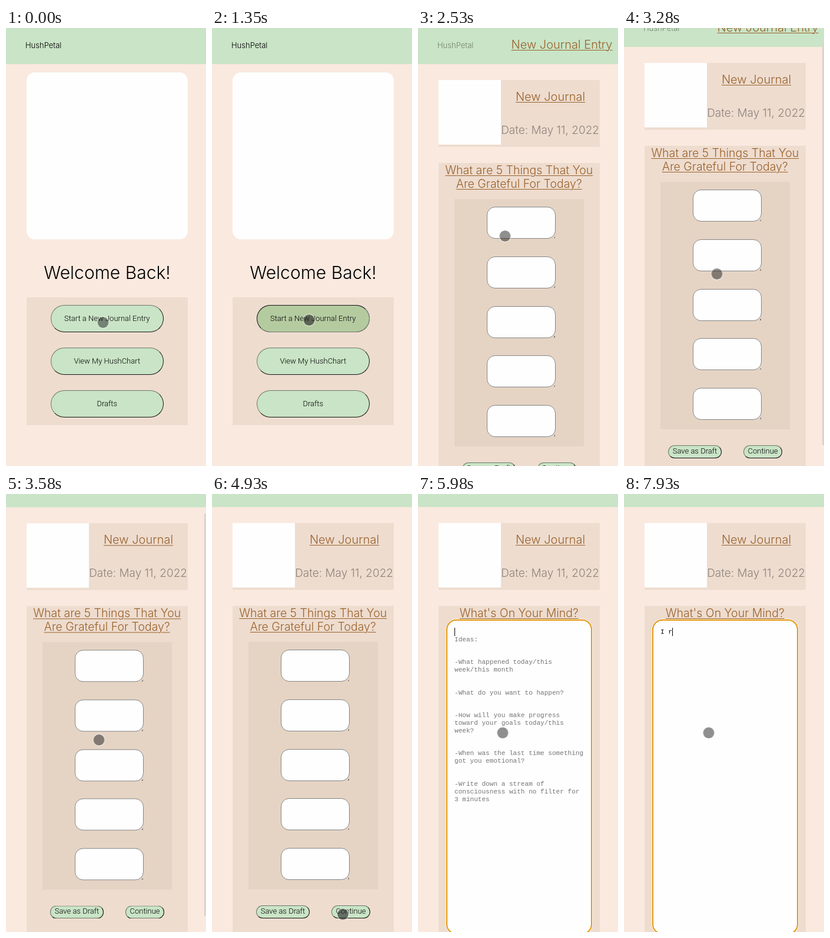
An HTML page that plays this animation: 340x740 px, repeating every 8 s.

```html
<!DOCTYPE html>
<html lang="en">
<head>
<meta charset="utf-8">
<title>Journal app</title>
<style>
html, body { margin: 0; width: 100%; height: 100%; overflow: hidden; background: #fae9df; }
#stage { position: relative; width: 340px; height: 740px; overflow: hidden; background: #fae9df; font: 300 20px/24px Inter, sans-serif; color: #000; }
#stage div { position: absolute; box-sizing: border-box; white-space: nowrap; }
.layer { left: 0; top: 0; width: 340px; height: 840px; }
.bar { left: 0; top: 0; width: 340px; height: 61px; background: #c9e4c6; }
.panel { left: 34.5px; width: 274.5px; background: #eedccf; }
.logo { left: 35px; background: #fefefe; }
.name { left: 33px; top: 16.5px; font-size: 13px; }
.link { text-align: center; color: #99622c; text-decoration: underline; text-decoration-thickness: 1.3px; text-underline-offset: 1.5px; }
.ask { left: 34.5px; width: 274.5px; top: 228.7px; font-size: 19.5px; line-height: 23.7px; }
.btn { border: 1.6px solid; border-color: #6f7a6f #151515 #151515 #6f7a6f; background: #c9e4c6; border-radius: 23px; font: 300 13px/43px Roboto, sans-serif; text-align: center; }
.big { left: 75.5px; width: 192.5px; height: 45.5px; }
.small { top: 734px; height: 21.5px; line-height: 18.3px; border-radius: 11px; }
.field { left: 117px; width: 116.5px; height: 54px; border: 1px solid #858585; border-radius: 14px; background: #fefefe; }
.field::after { content: ""; position: absolute; right: 0; bottom: 0; width: 3px; height: 3px; background: linear-gradient(135deg, transparent 50%, #777 50%); }
.mono { font: 400 11.07px/12.86px "Liberation Mono", monospace; left: 62px; }
#stage .hint { color: #757575; white-space: pre; top: 278.6px; }

/* Every change is a hard step on one 8 s clock */
#home, #entry, #grateful, #mind, #press, #rest, #focus, #hint, #typed div, #bar, #scroll, #cursor, #caret { animation: 8s step-end infinite; }
#home { animation-name: home; }
#entry { animation-name: entry; }
#grateful { animation-name: grateful; }
#mind { animation-name: mind; }
#press { animation-name: press; background: #b4cba0; border-color: #151515 #6f7a6f #6f7a6f #151515; }
#rest { animation-name: rest; left: 49px; top: 252px; width: 246px; height: 530px; border: 1px solid #858585; border-radius: 16px; background: #fefefe; }
#focus { animation-name: focus; left: 48px; top: 251px; width: 248px; height: 532px; border: 2px solid #e59a10; border-radius: 17px; background: #fefefe; box-shadow: 0 0 0 1px #fff9; }
#hint { animation-name: hint; }
#typed #one { animation-name: one; }
#typed #two { animation-name: two; }
#caret { animation-name: caret; left: 62px; top: 265px; width: 1px; height: 14px; background: #000; }
#scroll { animation-name: scroll; }
#bar { animation-name: bar; left: 337px; top: 0; width: 3px; height: 680px; border-radius: 2px; background: #dcd3cc; }
#cursor { animation-name: move; left: -10.5px; top: -10.5px; width: 21px; height: 21px; border-radius: 50%; border: 1.5px solid #fffa; background: #20202080; background-clip: padding-box; }

@keyframes home { 0% { opacity: 1 } 18.625%, 100% { opacity: 0 } }
@keyframes entry { 0% { opacity: 0 } 18.625%, 100% { opacity: 1 } }
@keyframes grateful { 0% { opacity: 1 } 63.5%, 100% { opacity: 0 } }
@keyframes mind { 0% { opacity: 0 } 63.5%, 100% { opacity: 1 } }
@keyframes press { 0% { opacity: 0 } 15% { opacity: 1 } 18.625%, 100% { opacity: 0 } }
@keyframes rest { 0% { opacity: 1 } 74.75%, 100% { opacity: 0 } }
@keyframes focus { 0% { opacity: 0 } 74.75%, 100% { opacity: 1 } }
@keyframes hint { 0% { opacity: 1 } 91.625%, 100% { opacity: 0 } }
@keyframes one { 0% { opacity: 0 } 91.625%, 100% { opacity: 1 } }
@keyframes two { 0% { opacity: 0 } 99.125%, 100% { opacity: 1 } }
@keyframes caret {
  0% { opacity: 0; transform: none }
  74.75% { opacity: 1; transform: none }
  91.625% { opacity: 1; transform: translateX(6.6px) }
  95.375% { opacity: 1; transform: translateX(13.3px) }
  99.125%, 100% { opacity: 1; transform: translateX(20px) }
}
@keyframes scroll {
  0% { transform: none }
  39.125% { transform: translateY(-12px) }
  41% { transform: translateY(-29px) }
  42.875% { transform: translateY(-36px) }
  44.75% { transform: translateY(-38.6px) }
  46.625%, 100% { transform: translateY(-39px) }
}
@keyframes bar {
  0% { opacity: 0; transform: none }
  39.125% { opacity: 1; transform: translateY(10px) }
  41% { opacity: 1; transform: translateY(25px) }
  42.875% { opacity: 1; transform: translateY(31px) }
  44.75% { opacity: 1; transform: translateY(33px) }
  46.625%, 100% { opacity: 0; transform: translateY(33px) }
}
@keyframes move {
  0% { transform: translate(164.5px, 497px) }
  1.875% { transform: translate(164.5px, 495px) }
  3.75% { transform: translate(164.5px, 493px) }
  13.125% { transform: translate(164.5px, 493px); background-color: #20202098 }
  18.625% { transform: translate(164.5px, 493px); background-color: #20202080 }
  24.25% { transform: translate(176px, 470px) }
  26.125% { transform: translate(207px, 398px) }
  27.875% { transform: translate(206px, 335px) }
  29.75% { transform: translate(162px, 328px) }
  31.625% { transform: translate(147.5px, 351px) }
  35.375% { transform: translate(149px, 362px) }
  37.25% { transform: translate(154px, 395px) }
  39.125% { transform: translate(157px, 412px) }
  41% { transform: translate(157.5px, 415px) }
  50.375% { transform: translate(163px, 440px) }
  52.25% { transform: translate(184px, 530px) }
  54.125% { transform: translate(208px, 640px) }
  56% { transform: translate(219px, 697px) }
  57.875% { transform: translate(222px, 709.5px); background-color: #20202080 }
  61.625% { transform: translate(222px, 709.5px); background-color: #20202098 }
  63.5% { transform: translate(222px, 709.5px); background-color: #20202080 }
  67.25% { transform: translate(214px, 670px) }
  69.125% { transform: translate(184px, 540px) }
  71% { transform: translate(155px, 437px) }
  72.875% { transform: translate(145px, 407px) }
  74.75%, 100% { transform: translate(143.5px, 403px); background-color: #20202080 }
}
</style>
</head>
<body>
<div id="stage">
  <div id="home" class="layer">
    <div class="bar"></div>
    <div class="name">HushPetal</div>
    <div class="logo" style="top:75px;width:274px;height:282px;border-radius:14px"></div>
    <div style="left:35px;width:274px;top:394.7px;text-align:center;font-size:30px;line-height:36px">Welcome Back!</div>
    <div class="panel" style="top:455px;height:216px"></div>
    <div class="btn big" style="top:468px">Start a New Journal Entry</div>
    <div class="btn big" id="press" style="top:468px">Start a New Journal Entry</div>
    <div class="btn big" style="top:540.3px">View My HushChart</div>
    <div class="btn big" style="top:612.4px">Drafts</div>
  </div>

  <div id="entry" class="layer" style="background:#fae9df">
    <div id="scroll" class="layer">
      <div class="bar"></div>
      <div class="name" style="color:#748272">HushPetal</div>
      <div class="link" style="right:9.5px;top:16px">New Journal Entry</div>
      <div class="panel" style="top:88px;height:113px"></div>
      <div class="logo" style="top:88px;width:106px;height:109px"></div>
      <div class="link" style="left:141px;width:168px;top:104px">New Journal</div>
      <div style="right:32px;top:161px;font-size:19px;color:#8d837c">Date: May 11, 2022</div>
      <div class="panel" style="top:228px;height:612px"></div>

      <div id="grateful" class="layer">
        <div class="link ask">What are 5 Things That You<br>Are Grateful For Today?</div>
        <div style="left:62px;top:289px;width:220px;height:418px;background:#e5d4c4"></div>
        <div class="field" style="top:302px"></div>
        <div class="field" style="top:385.8px"></div>
        <div class="field" style="top:469.6px"></div>
        <div class="field" style="top:553.4px"></div>
        <div class="field" style="top:637.2px"></div>
        <div class="btn small" style="left:75px;width:91px">Save as Draft</div>
        <div class="btn small" style="left:203px;width:66px">Continue</div>
      </div>

      <div id="mind" class="layer">
        <div class="link ask">What's On Your Mind?</div>
        <div id="rest"></div>
        <div id="focus"></div>
        <div id="hint" class="mono hint">Ideas:


-What happened today/this
week/this month


-What do you want to happen?


-How will you make progress
toward your goals today/this
week?


-When was the last time something
got you emotional?


-Write down a stream of
consciousness with no filter for
3 minutes</div>
        <div id="typed">
          <div id="one" class="mono" style="top:265.5px">I</div>
          <div id="two" class="mono" style="top:265.5px;left:75.3px">r</div>
        </div>
        <div id="caret"></div>
      </div>
    </div>
    <div id="bar"></div>
  </div>

  <div id="cursor"></div>
</div>
</body>
</html>
```
